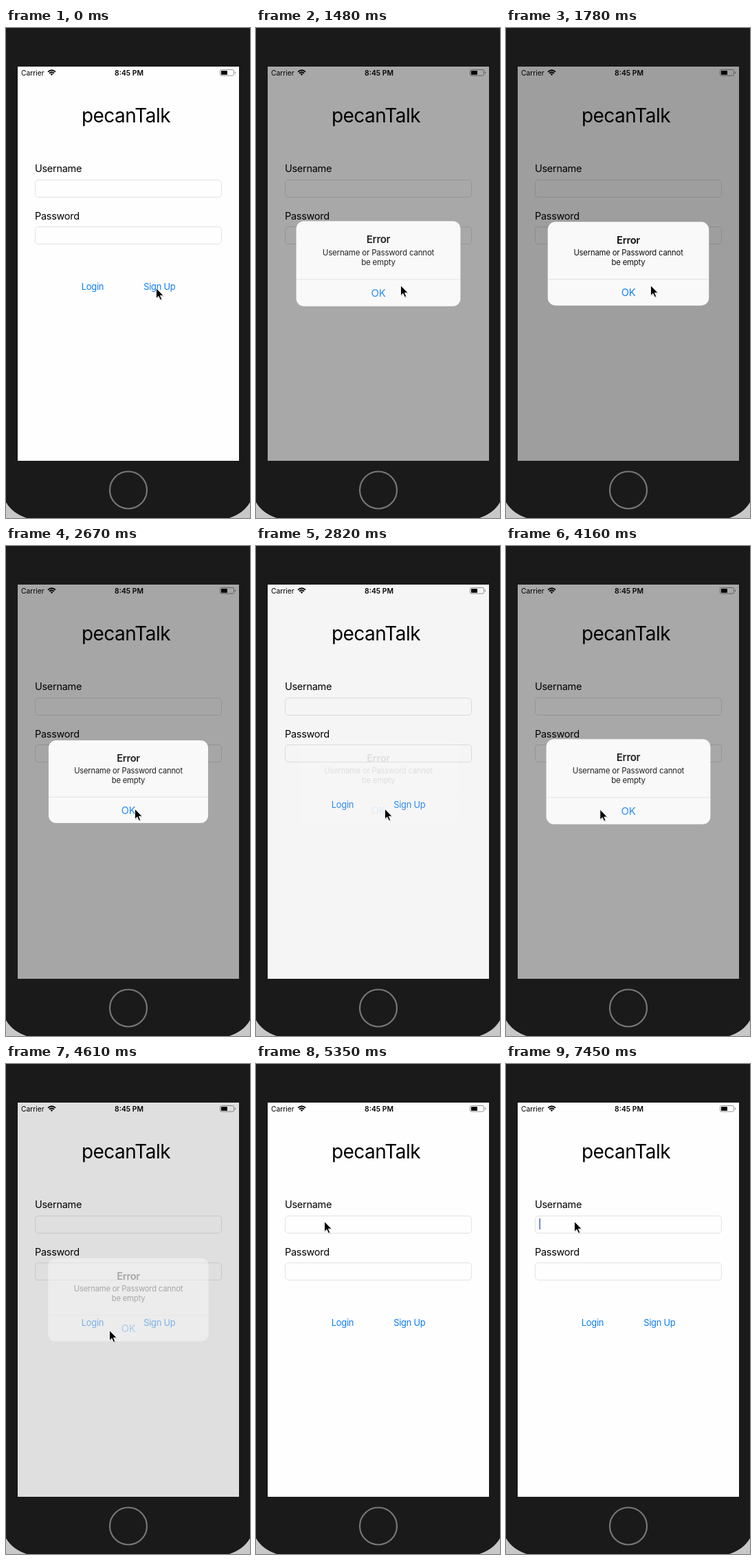
Recreate the animation shown at these times as an HTML page. Size 355 by 711 pixels, loop 8000 ms.

```html
<!DOCTYPE html>
<html lang="en">
<head>
<meta charset="utf-8">
<title>Login screen</title>
<style>
html, body { margin: 0; width: 100%; height: 100%; overflow: hidden; background: #1a1a1a; }
svg { display: block; width: 100%; height: 100%; }
text { font-family: Inter, Roboto, sans-serif; letter-spacing: -.02em; }
.mid { text-anchor: middle; }
.status { font-size: 10.3px; letter-spacing: 0; }
.title { font-size: 28px; }
.label { font-size: 14.5px; }
.link { font-size: 12.9px; fill: #0a7cf5; }
.field { fill: none; stroke: #e2e2e2; }
.head { font-size: 14.6px; font-weight: 600; }
.note { font-size: 11.2px; letter-spacing: -.017em; }
.ok { font-size: 14.6px; fill: #0a7cf5; }
</style>
</head>
<body>
<svg viewBox="0 0 355 711">
  <rect width="355" height="711" fill="#1a1a1a"/>
  <path d="M0 688Q9 704 30 711H0ZM355 688Q346 704 325 711H355Z" fill="#c8c8c8"/>
  <circle cx="178" cy="670.5" r="27" fill="none" stroke="#777" stroke-width="2.2"/>
  <rect x="17" y="56" width="322" height="572" fill="#fefefe"/>

  <text class="status" x="22" y="68.5">Carrier</text>
  <g fill="none" stroke="#000" stroke-width="1.9">
    <path d="M61 63.6Q66.5 58.8 72 63.6M63 65.8Q66.5 62.6 70 65.8"/>
    <path d="M64.6 67L66.5 69L68.4 67Q66.5 65.6 64.6 67Z" fill="#000" stroke="none"/>
  </g>
  <text class="status mid" x="179" y="68.5" font-weight="600">8:45 PM</text>
  <rect x="311.5" y="60.5" width="20" height="8.6" rx="1.8" fill="none" stroke="#8a8a8a" stroke-width=".9"/>
  <rect x="313" y="62" width="9" height="5.8" rx=".5"/>
  <path d="M333 63v3.6q1.2-.4 1.2-1.8T333 63Z" fill="#8a8a8a"/>

  <text class="title mid" x="174.5" y="137">pecanTalk</text>
  <text class="label" x="42" y="209">Username</text>
  <rect class="field" x="42.5" y="220.5" width="271" height="25" rx="4.5"/>
  <text class="label" x="42" y="277.5">Password</text>
  <rect class="field" x="42.5" y="288.5" width="271" height="25" rx="4.5"/>
  <text class="link mid" id="login" x="126" y="380">Login</text>
  <text class="link mid" id="signup" x="223.3" y="380">Sign Up</text>
  <rect id="caret" x="48.5" y="224" width="1.5" height="16" fill="#4a67c4"/>

  <rect id="dim" x="17" y="56" width="322" height="572"/>
  <g id="alert">
    <rect id="panel" x="-116" y="-60" width="232" height="120" rx="11" fill="#f9f9f9"/>
    <g id="words">
      <text class="head mid" y="-29">Error</text>
      <text class="note mid" y="-12">Username or Password cannot</text>
      <text class="note mid" y="2">be empty</text>
      <path d="M-116 22.3H116" stroke="#d9d9dc" stroke-width=".8"/>
      <text class="ok mid" y="47">OK</text>
    </g>
  </g>

  <g id="cursor">
    <path d="M.8 1.2V16L4.2 12.9L6.6 18.2L9 17.2L6.7 12H11.4Z" opacity=".2"/>
    <path d="M0 0V14.8L3.4 11.7L5.8 17L8.2 16L5.9 10.8H10.6Z" stroke="#fff" stroke-width=".9"/>
  </g>
</svg>
<script>
const LOOP = 8000, FIRST = 440, TICK = 149.15;
const $ = id => document.getElementById(id);
const clamp = v => Math.max(0, Math.min(1, v));

// Cursor tip: time, x, y
const path = [
  [0, 218.5, 377.5], [300, 218.5, 377.5], [589, 209.5, 373], [890, 210.5, 373.5],
  [2090, 210.5, 373.5], [2379, 187.5, 381.5], [2826, 187.5, 381.5],
  [3273, 109.5, 374], [3870, 109.5, 374], [4318, 150.5, 386.5],
  [4765, 150.5, 386.5], [5355, 99.5, 228.5], [LOOP, 99.5, 228.5]
];
const alerts = [
  { press: 890, show: 940, hide: 2651, button: 'signup' },
  { press: 3570, show: 3621, hide: 4511, button: 'login' }
];

function cursorAt(t) {
  const i = path.findIndex(p => p[0] > t);
  const [t0, x0, y0] = path[i - 1], [t1, x1, y1] = path[i];
  const k = (t - t0) / (t1 - t0);
  return [x0 + (x1 - x0) * k, y0 + (y1 - y0) * k];
}

const settle = ms => ms < 0 ? 0 : 1 - Math.exp(-.0035 * ms);

// Critically damped spring falling from 1 to 0
function release(ms) {
  const w = .0228 * Math.max(0, ms);
  return (1 + w) * Math.exp(-w);
}

function draw(time) {
  // The screen refreshes in even ticks
  const n = Math.floor((time - FIRST + 15) / TICK);
  const t = n < 0 ? 0 : FIRST + n * TICK;

  const a = alerts[t < 3500 ? 0 : 1];
  const shown = settle(t - a.show);
  const alpha = shown * release(t - a.hide);
  $('dim').setAttribute('opacity', .4 * alpha);
  $('panel').setAttribute('opacity', clamp(1.6 * alpha));
  $('words').setAttribute('opacity', alpha);
  $('alert').setAttribute('transform', `translate(178 342) scale(${1.2 - .2 * shown})`);

  for (const { press, button } of alerts)
    $(button).setAttribute('opacity', t < press ? 1 : clamp(.2 + (t - press) / 1000));

  $('cursor').setAttribute('transform', `translate(${cursorAt(t)})`);
  $('caret').setAttribute('opacity', n < 43 ? 0 : [1, .5, 0, 0][n - 43] ?? 1);
}

const start = performance.now();
function frame() {
  draw((performance.now() - start) % LOOP);
  requestAnimationFrame(frame);
}
frame();
</script>
</body>
</html>
```
